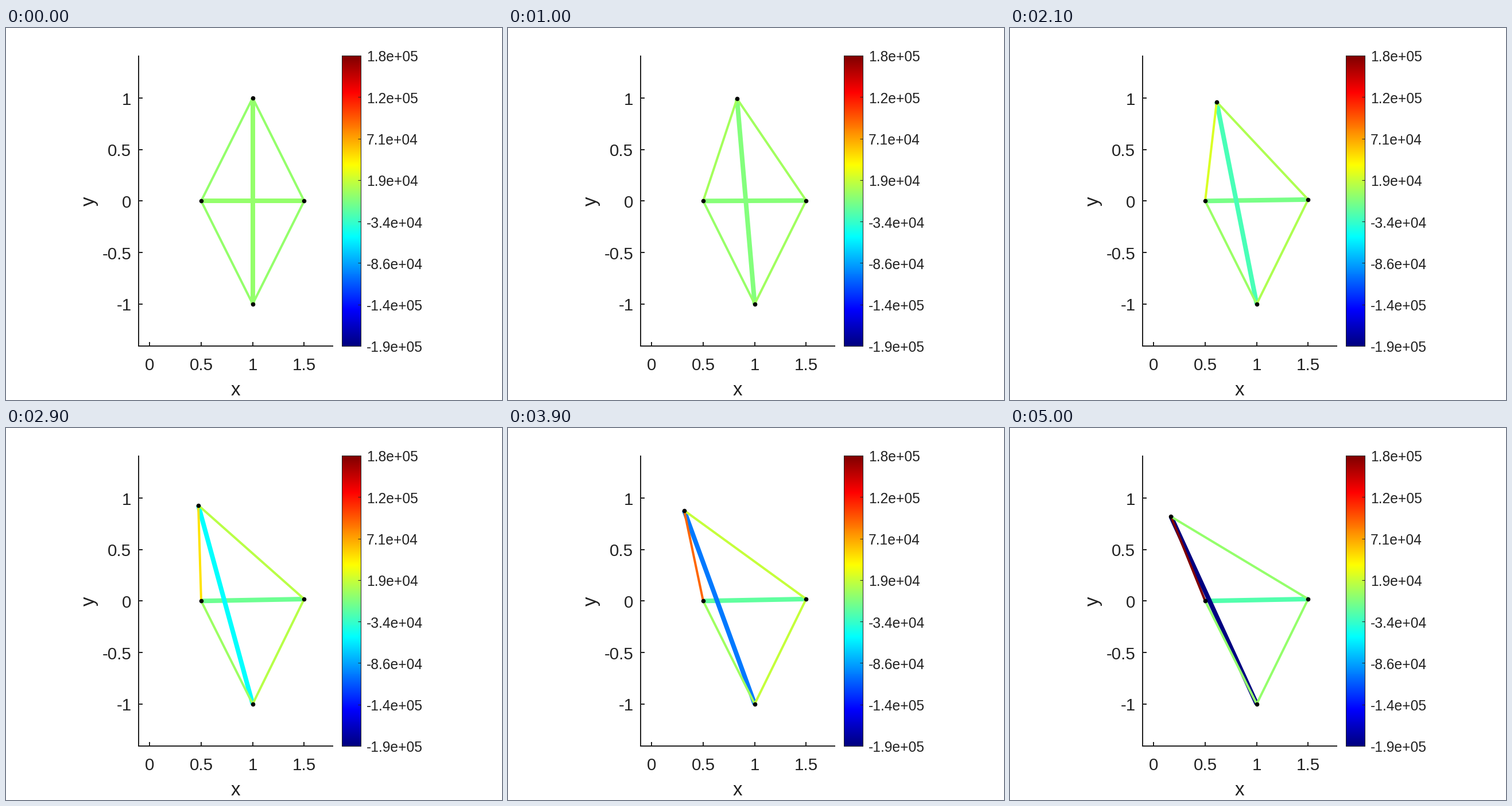
Animation of 864 by 648 pixels, one loop 5.1 s. Source, as a matplotlib script:

```python
import numpy as np
import matplotlib.pyplot as plt
from matplotlib.animation import FuncAnimation

W, H, DPI = 864, 648, 100
FRAMES, STEP_MS = 51, 100
PT = 72 / DPI  # points per pixel
INK = "#212121"

plt.rcParams["font.family"] = "Liberation Sans"

fig = plt.figure(figsize=(W / DPI, H / DPI), dpi=DPI, facecolor="white")
ax = fig.add_axes([0, 0, 1, 1])
ax.axis("off")

SCALE = 179.4
X0, Y0 = 250.3, 301.3


def px(x):
    return X0 + SCALE * x


def py(y):
    return Y0 - SCALE * y


def jet(t):
    t = np.asarray(t, float)
    return np.stack([np.clip(1.5 - np.abs(4 * t - c), 0, 1) for c in (3, 2, 1)], -1)


def line(xs, ys, width, color=INK, z=1):
    return ax.plot(xs, ys, color=color, lw=width * PT, zorder=z,
                   solid_capstyle="butt")[0]


def label(x, y, s, size, **kw):
    ax.text(x, y, s, fontsize=size * PT, color=INK, va="baseline", **kw)


# Axes frame
LEFT, RIGHT, TOP, BOTTOM = 231, 570, 48, 554
line([LEFT, LEFT], [TOP, BOTTOM + 1], 2)
line([LEFT - 1, RIGHT], [BOTTOM, BOTTOM], 2)
for v in np.arange(0, 2, 0.5):
    line([px(v)] * 2, [BOTTOM, BOTTOM - 7], 2)
    label(px(v), 596, f"{v:g}", 29.5, ha="center")
for v in np.arange(-1, 1.5, 0.5):
    line([LEFT, LEFT + 7], [py(v)] * 2, 2)
    label(218.5, py(v) + 11.7, f"{v:g}", 29.5, ha="right")
label(400, 640, "x", 33, ha="center")
label(154, 302, "y", 33, ha="center", rotation=90, rotation_mode="anchor")

# Colour bar
BAR_L, BAR_R = 585, 618
ramp = jet(np.linspace(0, 1, 256))[:, None, :]
ax.imshow(ramp, extent=(BAR_L, BAR_R, BOTTOM, TOP), origin="lower",
          interpolation="nearest", aspect="auto", zorder=1)
line([BAR_L, BAR_R, BAR_R, BAR_L, BAR_L], [TOP, TOP, BOTTOM, BOTTOM, TOP], 1, z=2)
for y, v in zip(np.linspace(TOP, BOTTOM, 8), np.linspace(1.76e5, -1.91e5, 8)):
    line([BAR_R - 5, BAR_R], [y, y], 1, z=2)
    label(628, y + 10.5, f"{v:.1e}", 24.6, ha="left")

# Truss: the top node swings about the bottom one
ROD = 2 * SCALE
SWING_KEYS = (0, 10, 21, 35, 43, 50)
SWING_ANGLES = (0, 0.0858, 0.1955, 0.3210, 0.378, 0.4289)
REST = 0.52  # place of zero stress on the colour scale


def buckle(gain):
    return lambda u: gain * (0.8 * u ** 2 + 0.2 * u ** 6)


def stretch(gain, release=2):
    """Linear stress that vanishes once the bar is released."""
    return lambda u: gain * u if u < release else 0


# (start, end, width, stress)
BARS = (
    ("left", "right", 8, stretch(-0.065)),
    ("top", "bottom", 8, buckle(-REST)),
    ("left", "top", 4, buckle(1 - REST)),
    ("top", "right", 4, stretch(0.062, 0.94)),
    ("left", "bottom", 4, stretch(0.014, 0.8)),
    ("bottom", "right", 4, stretch(0.06, 0.8)),
)


def nodes(i, u):
    angle = np.interp(i, SWING_KEYS, SWING_ANGLES)
    lift = 3.4 * np.sin(np.pi / 2 * min(1, u / 0.65)) ** 2
    foot = (px(1), py(-1))
    return {"left": (px(0.5), py(0)), "bottom": foot,
            "top": (foot[0] - ROD * np.sin(angle), foot[1] - ROD * np.cos(angle)),
            "right": (px(1.5), py(0) - lift)}


rods = [line([], [], w, z=5 + k) for k, (_, _, w, _) in enumerate(BARS)]
dots, = ax.plot([], [], "o", color="black", ms=7.6 * PT, mew=0, zorder=20)

ax.set_xlim(0, W)
ax.set_ylim(H, 0)


def draw(i):
    u = i / (FRAMES - 1)
    pos = nodes(i, u)
    for rod, (a, b, _, stress) in zip(rods, BARS):
        rod.set_data(*zip(pos[a], pos[b]))
        rod.set_color(jet(REST + stress(u)))
    dots.set_data(*zip(*pos.values()))
    return [*rods, dots]


anim = FuncAnimation(fig, draw, frames=FRAMES, interval=STEP_MS,
                     init_func=lambda: draw(0), repeat=True, repeat_delay=0)
plt.show()
```
